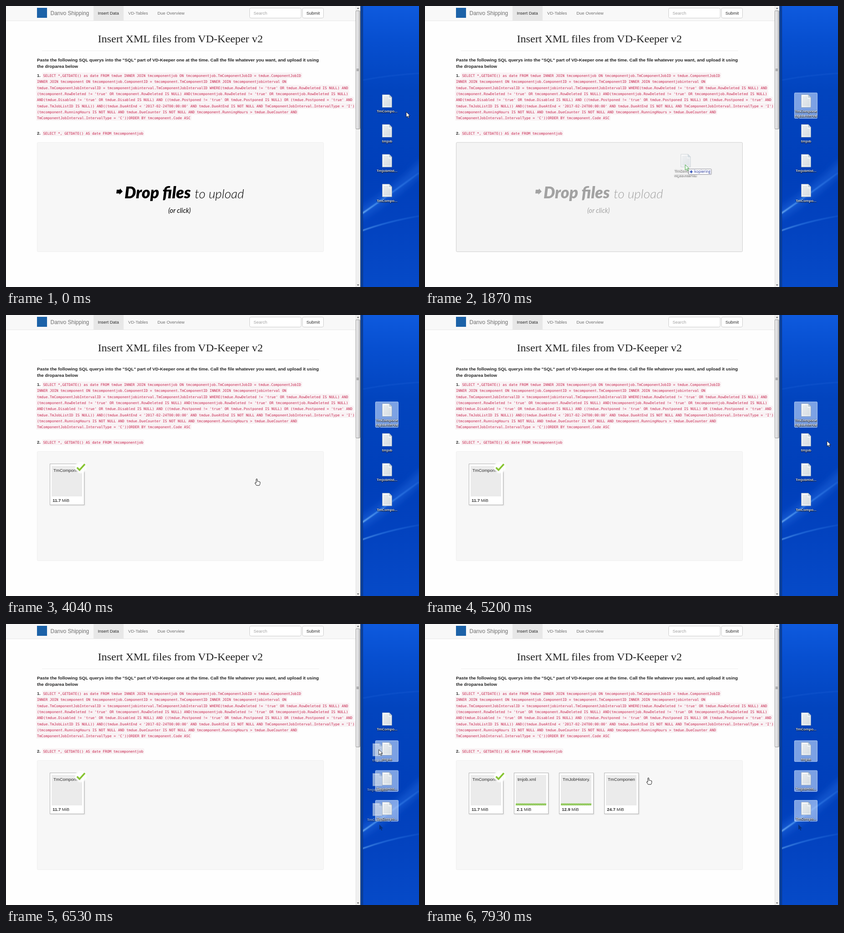
An HTML page for the animation above (8000 ms loop, 906 by 618 pixels).

```html
<!DOCTYPE html>
<html lang="en">
<head>
<meta charset="utf-8">
<title>File upload</title>
<style>
html, body { margin: 0; width: 100%; height: 100%; overflow: hidden; background: #fefefe; }
svg { display: block; width: 906px; height: 618px; }
text { font: 9.45px "Liberation Sans", Arial, sans-serif; fill: #2b2b2b; white-space: pre; }
.brand { font-size: 12px; fill: #707070; }
.nav { fill: #707070; }
.title { font: 24.1px "Liberation Serif", "Times New Roman", serif; fill: #222; text-anchor: middle; }
.bold { font-weight: bold; }
.intro { font-size: 9.81px; font-weight: bold; fill: #222; }
.code { font: 7.774px "DejaVu Sans Mono", monospace; fill: #c7254e; }
.drop { font: italic 900 35.6px Lato, sans-serif; fill: #000; }
.upload { font: italic 300 28px Lato, sans-serif; fill: #000; }
.click { font: italic 400 14.5px Lato, sans-serif; fill: #000; }
.label { font: 600 7.9px "Open Sans", "Noto Sans", sans-serif; fill: #fff; text-anchor: middle; filter: drop-shadow(0 1px .6px #000) drop-shadow(0 0 1px #0008); }
.tip { font: 8.2px "Open Sans", sans-serif; fill: #239; }
</style>
</head>
<body>
<svg id="stage" viewBox="0 0 906 618"></svg>
<script>
const LOOP = 8000;
const stage = document.getElementById('stage');

const text = (x, y, cls, s) => `<text x="${x}" y="${y}" class="${cls}">${s}</text>`;
const rect = (x, y, w, h, fill, more = '') =>
  `<rect x="${x}" y="${y}" width="${w}" height="${h}" fill="${fill}" ${more}/>`;
const path = (d, more) => `<path d="${d}" ${more}/>`;
const group = (id, body) => `<g id="${id}">${body}</g>`;
const stops = (...list) => list.map(([o, c, a = 1]) =>
  `<stop offset="${o}" stop-color="${c}" stop-opacity="${a}"/>`).join('');

const CHAR = 4.68;
const query = [
  "SELECT *,GETDATE() as date FROM tmdue INNER JOIN tmcomponentjob ON tmcomponentjob.TmComponentJobID = tmdue.ComponentJobID",
  "INNER JOIN tmcomponent ON tmcomponentjob.ComponentID = tmcomponent.TmComponentID INNER JOIN tmcomponentjobinterval ON",
  "tmdue.TmComponentJobIntervalID = tmcomponentjobinterval.TmComponentJobIntervalID WHERE(tmdue.RowDeleted != 'true' OR tmdue.RowDeleted IS NULL) AND",
  "(tmcomponent.RowDeleted != 'true' OR tmcomponent.RowDeleted IS NULL) AND(tmcomponentjob.RowDeleted != 'true' OR tmcomponentjob.RowDeleted IS NULL)",
  "AND(tmdue.Disabled != 'true' OR tmdue.Disabled IS NULL) AND ((tmdue.Postponed != 'true' OR tmdue.Postponed IS NULL) OR (tmdue.Postponed = 'true' AND",
  "tmdue.TmJobListID IS NULL)) AND((tmdue.DueAtEnd < '2017-02-24T00:00:00' AND tmdue.DueAtEnd IS NOT NULL AND TmComponentJobInterval.IntervalType = 'I')",
  "(tmcomponent.RunningHours IS NOT NULL AND tmdue.DueCounter IS NOT NULL AND tmcomponent.RunningHours > tmdue.DueCounter AND",
  "TmComponentJobInterval.IntervalType = 'C'))ORDER BY tmcomponent.Code ASC",
];
const codeLine = (s, x, y) =>
  rect(x - 2, y - 9.6, s.length * CHAR + 4, 12.6, '#f9f2f4', 'rx="2"') +
  text(x, y, 'code', s.replace(/</g, '&lt;'));

const defs = `<defs>
  <linearGradient id="sky" x2="0" y2="1">${stops([0, '#0e5ade'], [.12, '#074fd0'], [.3, '#0244be'], [.6, '#003fba'], [.8, '#0343c0'], [1, '#064ac8'])}</linearGradient>
  <linearGradient id="streak">${stops([0, '#8fd0ff', .8], [.4, '#4ea0ff', .6], [1, '#4ea0ff', .2])}</linearGradient>
  <linearGradient id="thumb">${stops([0, '#f4f4f4'], [.5, '#dcdcde'], [1, '#c4c4c8'])}</linearGradient>
  <linearGradient id="paper" x2="1" y2="1">${stops([0, '#fff'], [1, '#dde4ea'])}</linearGradient>
  <filter id="soft" x="-50%" y="-50%" width="200%" height="200%"><feGaussianBlur stdDeviation="1.2"/></filter>
  <filter id="wide" x="-50%" y="-50%" width="200%" height="200%"><feGaussianBlur stdDeviation="9"/></filter>
  <clipPath id="name"><rect x="8" y="8" width="59.5" height="14"/></clipPath>
  <clipPath id="desk"><rect x="783" width="123" height="618"/></clipPath>
  <pattern id="stripes" width="4" height="4" patternUnits="userSpaceOnUse">
    ${rect(0, 0, 4, 4, '#b0dc85')}${path('M-1 5L5-1M-3 3L3-3M1 7L7 1', 'stroke="#7dbb42" stroke-width="1.5"')}
  </pattern>
  <g id="doc">
    ${path('M-10.5 0H5L10.5 6V28H-10.5Z', 'fill="url(#paper)" stroke="#8c9aa5" stroke-width=".6"')}
    ${path('M5 0V6H10.5Z', 'fill="#c5d2dc" stroke="#93a4b0" stroke-width=".5"')}
    ${path('M-8 5H3M-8 8H3M-8 11H8M-8 14H8M-8 17H8M-8 20H8M-8 23H8', 'stroke="#b6c0c8" stroke-width=".8"')}
  </g>
  ${path('M0 0V11.6L2.7 9.1L4.6 13.2L6.4 12.4L4.6 8.4H8.3Z', 'id="arrow"')}
</defs>`;

const page =
  rect(0, 0, 767, 618, '#fefefe') + rect(0, 0, 767, 32, '#f8f8f8') + rect(0, 32, 767, 1, '#e7e7e7') +
  rect(192, 0, 66, 32, '#e7e7e7') + rect(68, 4, 22, 22, '#1c62a8') +
  text(97.5, 20, 'brand', 'Danvo Shipping') + text(201.5, 19, '', 'Insert Data') +
  text(268, 19, 'nav', 'VD-Tables') + text(332.3, 19, 'nav', 'Due Overview') +
  rect(534.5, 4.5, 113, 22, '#fff', 'rx="3" stroke="#ccc"') +
  `<g opacity=".65">${text(543, 19, 'nav', 'Search')}</g>` +
  rect(650.5, 4.5, 46, 22, '#fff', 'rx="3" stroke="#ccc"') + text(659, 19, '', 'Submit') +
  text(382.5, 80, 'title', 'Insert XML files from VD-Keeper v2') + rect(79, 98, 608, 1, '#eee') +
  text(68, 122, 'intro', 'Paste the following SQL querys into the "SQL" part of VD-Keeper one at the time. Call the file whatever you want, and upload it using') +
  text(68, 136, 'intro', 'the droparea below') +
  text(68, 156, 'bold', '1.') +
  query.map((s, i) => codeLine(s, i ? 68 : 81.4, Math.round(156 + i * 13.35))).join('') +
  text(68, 283, 'bold', '2.') + codeLine('SELECT *, GETDATE() AS date FROM tmcomponentjob', 81.4, 283);

const dropZone =
  `<rect id="zone" x="68.5" y="300" width="628" height="240.5" rx="2"/>` +
  group('message',
    path('M243 404H249.5L250.3 401.5L256 408L248.5 415L249 412.3H242Z', '') +
    text(260, 423, 'drop', 'Drop files') + text(414, 423, 'upload', 'to upload') + text(356, 454.5, 'click', '(or click)'));

const files = [['TmComponentJobInterval', '11.7'], ['tmjob.xml', '2.1'], ['TmJobHistory.xml', '12.9'], ['TmComponentJob.xml', '24.7']];
const cards = files.map(([name, size], i) => `<g id="card${i}" transform="translate(${96 + 99 * i} 327)">
  ${rect(1, 1, 76, 91, '#0002', 'filter="url(#soft)"')}
  ${rect(.5, .5, 75, 90, '#fff', 'stroke="#b4b4b4"')}${rect(4, 5, 67, 67, '#ebebeb')}
  <g clip-path="url(#name)">${text(8, 18, '', name)}</g>
  ${rect(4, 67.5, 67, 4.5, 'url(#stripes)', `id="bar${i}"`)}
  ${text(6.3, 84, '', `<tspan class="bold">${size}</tspan> MiB`)}</g>`).join('') +
  group('check', `<circle cx="164" cy="335.5" r="12.5" fill="#fff" opacity=".9" filter="url(#soft)"/>` +
    path('M155.8 335.5L161.3 341L173 328', 'fill="none" stroke="#86c430" stroke-width="3.6"'));

const scrollbar =
  rect(767, 0, 10, 618, '#f1f1f1') + rect(767, 0, 1, 618, '#e2e2e2') +
  rect(767.5, 10.5, 9, 260, 'url(#thumb)', 'rx="1.5" stroke="#979797"') +
  path('M769 138.5H774M769 140.5H774M769 142.5H774', 'stroke="#666" stroke-width=".8"') +
  path('M769.8 6.3H774.8L772.3 3.5ZM769.8 612.5H774.8L772.3 615.3Z', 'fill="#555"');

const desktop =
  rect(777, 0, 1, 618, '#5d7fb0') + rect(778, 0, 1, 618, '#0a1f50') +
  rect(779, 0, 3, 618, '#0d49a8') + rect(782, 0, 1, 618, '#06256b') +
  `<g clip-path="url(#desk)">${rect(783, 0, 123, 618, 'url(#sky)')}` +
  path('M770 462Q850 415 920 345', 'fill="none" stroke="#3f8dff" stroke-opacity=".4" stroke-width="14" filter="url(#wide)"') +
  path('M776 460Q830 423 906 367', 'fill="none" stroke="url(#streak)" stroke-width="3" filter="url(#soft)"') +
  path('M776 496Q835 474 906 462', 'fill="none" stroke="url(#streak)" stroke-width="2" filter="url(#soft)"') +
  path('M783 163Q840 152 906 148', 'fill="none" stroke="#2a6be0" stroke-opacity=".35" stroke-width="2" filter="url(#soft)"') + '</g>';

const PITCH = 65.6;
const labels = ['TmCompo...', 'tmjob', 'TmJobHist...', 'TmCompo...'];
const longLabel = text(836, 234.3, 'label', 'TmCompone') + text(836, 243.5, 'label', 'ntJobInterval');
const doc = i => `<use href="#doc" x="836" y="${195 + PITCH * i}"/>`;
const shortLabel = i => text(836, 234 + PITCH * i, 'label', labels[i]);
const icons = labels.map((_, i) =>
  `<rect id="sel${i}" x="810.5" y="${191 + PITCH * i}" width="50" height="${i ? 46 : 56}" rx="1.5" fill="#cfe2ff" fill-opacity=".6" stroke="#c4daf8" stroke-opacity=".85"/>` +
  doc(i) + (i ? shortLabel(i) : group('short', shortLabel(0)) + group('long', longLabel))).join('');

const overlays =
  `<use id="stain" href="#arrow" x="819" y="441" fill="#0a2a66" opacity=".75"/>` +
  `<rect id="marquee" fill="#5aa0ff" fill-opacity=".3" stroke="#8ec2ff" stroke-width=".8"/>` +
  group('ghostOne', doc(0) + longLabel) +
  group('ghostMany', [1, 2, 3].map(i => doc(i) + shortLabel(i)).join('')) +
  group('cursor',
    group('pointer', `<use href="#arrow" fill="#fff" stroke="#000" stroke-width=".8"/>`) +
    group('copy', `<use href="#arrow" fill="#fff" stroke="#2b9a2b" stroke-width=".9"/>` +
      rect(7.5, 9.5, 50, 12, '#fff', 'rx="1" stroke="#8a8a96"') +
      path('M10 15.5H16.4M13.2 12.3V18.7', 'stroke="#1c3fb0" stroke-width="1.8"') + text(20, 18.4, 'tip', 'kopiering')) +
    group('hand', path('M-1.2 1Q0-.6 1.2 1V6Q2.6 4.8 3.6 6.2Q5 5.4 5.8 6.8Q7.4 6.4 7.4 8V10.5Q7 13 5.8 14.8H-.6L-4 9.6Q-3.6 7.6-1.2 9.6Z',
      'fill="#fff" stroke="#000" stroke-width=".9"')));

stage.innerHTML = defs + page + dropZone + cards + scrollbar + desktop + icons + overlays;

const part = Object.fromEntries([...stage.querySelectorAll('[id]')].map(e => [e.id, e]));
const set = (id, attrs) => { for (const k in attrs) part[id].setAttribute(k, attrs[k]); };
const show = (id, on) => set(id, { display: on ? 'inline' : 'none' });
const smooth = p => p * p * (3 - 2 * p);
const ramp = (t, a, b) => smooth(Math.min(1, Math.max(0, (t - a) / (b - a))));

// time, x, y, eased
const moves = [
  [0, 878, 233], [70, 878, 233], [480, 849, 218, 1], [690, 849, 218], [840, 840, 218], [990, 835, 218],
  [1300, 800, 223], [1770, 611, 327], [1870, 571, 349], [2020, 550, 360], [4450, 550, 360],
  [5200, 882, 277, 1], [5280, 874, 290], [5740, 819, 441], [5850, 819, 441], [6250, 839, 274, 1],
  [6400, 839, 274], [6530, 819, 276], [6600, 737, 286], [6720, 650, 305], [7000, 490, 338], [LOOP, 490, 338],
];
function cursorAt(t) {
  const i = moves.findIndex(m => m[0] > t);
  const [t0, x0, y0] = moves[i - 1], [t1, x1, y1, eased] = moves[i];
  let p = (t - t0) / (t1 - t0);
  if (eased) p = smooth(p);
  return [x0 + (x1 - x0) * p, y0 + (y1 - y0) * p];
}

const cardStart = [2460, 7420, 7420, 7420];
const barSpan = [[2600, 3820], [7520, LOOP], [7700, LOOP], [LOOP, LOOP]];

function render(t) {
  const [x, y] = cursorAt(t);
  const within = (a, b) => t >= a && t < b;
  const inZone = x < 697 && y > 300;
  const dragOne = within(1320, 2390), dragMany = within(6400, 7310);
  const hover = (dragOne || dragMany) && inZone;

  set('zone', { fill: hover ? '#f4f4f4' : '#f7f7f7', stroke: hover ? '#cfcfcf' : '#efefef' });
  show('message', t < 2430);
  set('message', { opacity: 1 - .85 * ramp(t, 1660, 1960) });

  cardStart.forEach((start, i) => {
    show('card' + i, t >= start);
    show('bar' + i, within(...barSpan[i]));
  });
  set('stripes', { x: (t / 400 * 4) % 4 });
  set('check', { opacity: ramp(t, 3740, 4040) });

  const firstSelected = within(380, 5270);
  show('sel0', firstSelected);
  show('long', firstSelected);
  show('short', !firstSelected);
  const marqueeOn = within(5240, 5850);
  show('marquee', marqueeOn);
  if (marqueeOn) set('marquee', { x, y: 277, width: Math.max(0, 882 - x), height: Math.max(0, y - 277) });
  for (let i = 1; i < 4; i++) show('sel' + i, t > 5240 && (t > 5740 || (x < 861 && y > 191 + PITCH * i)));
  show('stain', t >= 5850);

  show('ghostOne', dragOne);
  set('ghostOne', { opacity: .6, transform: `translate(${x - 835} ${y - 218})` });
  show('ghostMany', dragMany);
  set('ghostMany', { opacity: .6, transform: `translate(${x - 839} ${y - 274})` });

  const hand = inZone && !hover;
  set('cursor', { transform: `translate(${x} ${y})` });
  show('hand', hand);
  show('copy', hover);
  show('pointer', !hand && !hover);
}

const begin = performance.now();
function tick() {
  render((performance.now() - begin) % LOOP);
  requestAnimationFrame(tick);
}
tick();
</script>
</body>
</html>
```
